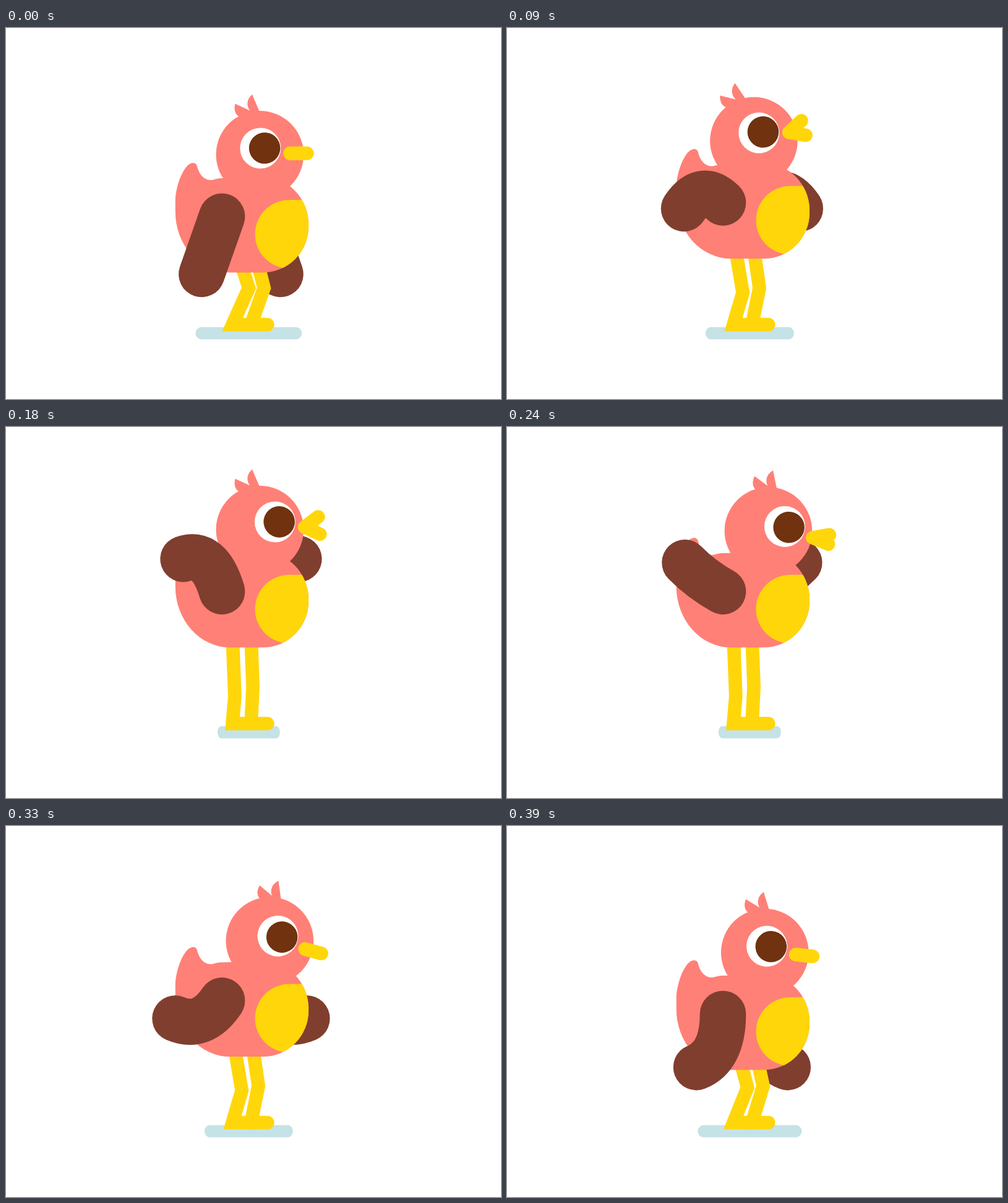
Write an HTML page with a canvas that moves like this. It is 800 px wide and 600 px high and loops after 420 ms.

```html
<!DOCTYPE html>
<html lang="en">
<head>
<meta charset="utf-8">
<title>Flapping bird</title>
<style>
  html, body { margin: 0; width: 100%; height: 100%; overflow: hidden; background: #fff; }
  canvas { display: block; }
</style>
</head>
<body>
<canvas id="stage" width="800" height="600"></canvas>
<script>
const ctx = document.getElementById('stage').getContext('2d');
const LOOP = 420, STEP = 30, STEPS = LOOP / STEP;
const PINK = '#ff8077', YELLOW = '#ffd60a', WING = '#803e2e', PUPIL = '#70320f', SHADOW = '#c5e2e6';
const { PI, cos, abs, min, max } = Math;

// Share of the full rise, one value per step; the fall mirrors it.
const RISE = [0, 0.025, 0.2, 0.57, 0.85, 0.955, 0.99, 1];

// Time, then wing tip and curve handle relative to the shoulder.
const WING_KEYS = [
  [0, -32.7, 93.2, -16.4, 46.6],
  [60, -50, 40.5, -38.4, -6.2],
  [120, -72.5, -19, -26.5, -55.5],
  [180, -62.5, -52.5, -20.5, -67.7],
  [240, -61.5, -46.5, -34.4, -19],
  [330, -75.5, 29, -31.6, 47.6],
  [390, -43, 86.3, 0, 69.3]
];

const easeSine = u => (1 - cos(PI * min(1, max(0, u)))) / 2;

function wingKey(i) {
  const n = WING_KEYS.length, turn = Math.floor(i / n);
  const [time, ...values] = WING_KEYS[i - turn * n];
  return { time: time + turn * LOOP, values };
}

// Smooth periodic curve through the wing keys.
function wingPose(t) {
  const i = WING_KEYS.findLastIndex(key => key[0] <= t);
  const [a, b, c, d] = [i - 1, i, i + 1, i + 2].map(wingKey);
  const span = c.time - b.time, u = (t - b.time) / span;
  return b.values.map((from, k) => {
    const to = c.values[k];
    const m0 = (to - a.values[k]) / (c.time - a.time) * span;
    const m1 = (d.values[k] - from) / (d.time - b.time) * span;
    return from * (2 * u ** 3 - 3 * u ** 2 + 1) + m0 * (u ** 3 - 2 * u ** 2 + u)
      + to * (3 * u ** 2 - 2 * u ** 3) + m1 * (u ** 3 - u ** 2);
  });
}

function fill(color, path) {
  ctx.fillStyle = color;
  ctx.fill(path);
}

function disc(x, y, r, color) {
  ctx.beginPath();
  ctx.arc(x, y, r, 0, 2 * PI);
  ctx.fillStyle = color;
  ctx.fill();
}

function polyline(points, color, width) {
  ctx.beginPath();
  points.forEach(([x, y]) => ctx.lineTo(x, y));
  ctx.strokeStyle = color;
  ctx.lineWidth = width;
  ctx.lineCap = 'round';
  ctx.lineJoin = 'miter';
  ctx.stroke();
}

function at(x, y, draw) {
  ctx.save();
  ctx.translate(x, y);
  draw();
  ctx.restore();
}

const bodyPath = new Path2D(`M350 243 L415 241 A74 77 0 0 1 489 315 L489 321
  A74 74.5 0 0 1 415 395.5 L362 395.5 A88.3 98.5 0 0 1 273.7 297 L273.7 280
  C273.7 257 287 220 301 218.3 C305 218 308 219.5 309 224
  C311 233 318 246 331 246 C338 245.5 339 243 350 243 Z`);
const bellyPath = new Path2D('M500 278 H458 A55.5 55.5 0 0 0 458 389 H500 Z');
const crestPath = new Path2D(`M-12 -97.2 L0 -69 L-12 -68 C-20 -73 -24 -87 -12 -97.2 Z
  M-39.5 -82.3 L-11 -69 L-30 -60 C-40 -63 -42 -73 -39.5 -82.3 Z`);

function drawShadow(t) {
  const half = 67.3 + 18.7 * cos(2 * PI * t / LOOP);
  at(392.3, 493.6, () => {
    ctx.scale(half / 86, 1);
    ctx.beginPath();
    ctx.roundRect(-86, -9.8, 172, 19.6, 9.8);
    ctx.fillStyle = SHADOW;
    ctx.fill();
  });
}

function drawWing([tipX, tipY, handleX, handleY]) {
  ctx.beginPath();
  ctx.moveTo(0, 0);
  ctx.quadraticCurveTo(handleX, handleY, tipX, tipY);
  ctx.strokeStyle = WING;
  ctx.lineWidth = 74.6;
  ctx.lineCap = 'round';
  ctx.stroke();
}

function drawLegs(t) {
  const u = 1 - abs(1 - t / (LOOP / 2));
  polyline([[366, 338], [392.5 - 26.5 * u, 420.5 + 17.5 * u], [366, 479.6], [422.6, 479.6]], YELLOW, 21.8);
  polyline([[396, 338], [417 - 21 * u, 420.5], [396, 479.6]], YELLOW, 21.8);
}

function drawBody() {
  fill(PINK, bodyPath);
  ctx.save();
  ctx.clip(bodyPath);
  fill(YELLOW, bellyPath);
  ctx.restore();
}

function drawBeak(t) {
  const open = easeSine((150 - abs(t - 150)) / 120);
  const jaw = degrees => {
    const angle = degrees * PI / 180;
    polyline([[0, 0], [27.4 * cos(angle), 27.4 * Math.sin(angle)]], YELLOW, 21.8);
  };
  jaw(-37 * open ** 0.8);
  jaw(25 * open ** 1.2);
}

function drawHead(t) {
  const tilt = 2.85 - 13.9 * cos(2 * PI * (t - 90) / LOOP);
  const turn = easeSine(t / (LOOP / 2) > 1 ? 2 - t / (LOOP / 2) : t / (LOOP / 2));
  at(405.5, 264.7, () => {
    ctx.rotate(tilt * PI / 180);
    ctx.translate(5, -60);
    disc(0, 0, 70.8, PINK);
    fill(PINK, crestPath);
    ctx.translate(24.8 * turn, -2 * turn);
    disc(1, -10.3, 33, '#fff');
    disc(7.8, -10.4, 25.3, PUPIL);
    at(48.9, -1.7, () => drawBeak(t));
  });
}

function drawBird(step) {
  const t = step * STEP;
  const lift = -39.3 * RISE[min(step, STEPS - step)];
  const wing = wingPose(t);
  ctx.fillStyle = '#fff';
  ctx.fillRect(0, 0, 800, 600);
  drawShadow(t);
  at(410.7, 304.8 + lift, () => {
    ctx.scale(-1, 1);
    drawWing(wing);
  });
  drawLegs(t);
  at(0, lift, () => {
    drawBody();
    drawHead(t);
    at(349, 304.8, () => drawWing(wing));
  });
}

const start = performance.now();
function tick(now) {
  drawBird(Math.floor(max(0, now - start) / STEP) % STEPS);
  requestAnimationFrame(tick);
}
drawBird(0);
requestAnimationFrame(tick);
</script>
</body>
</html>
```
